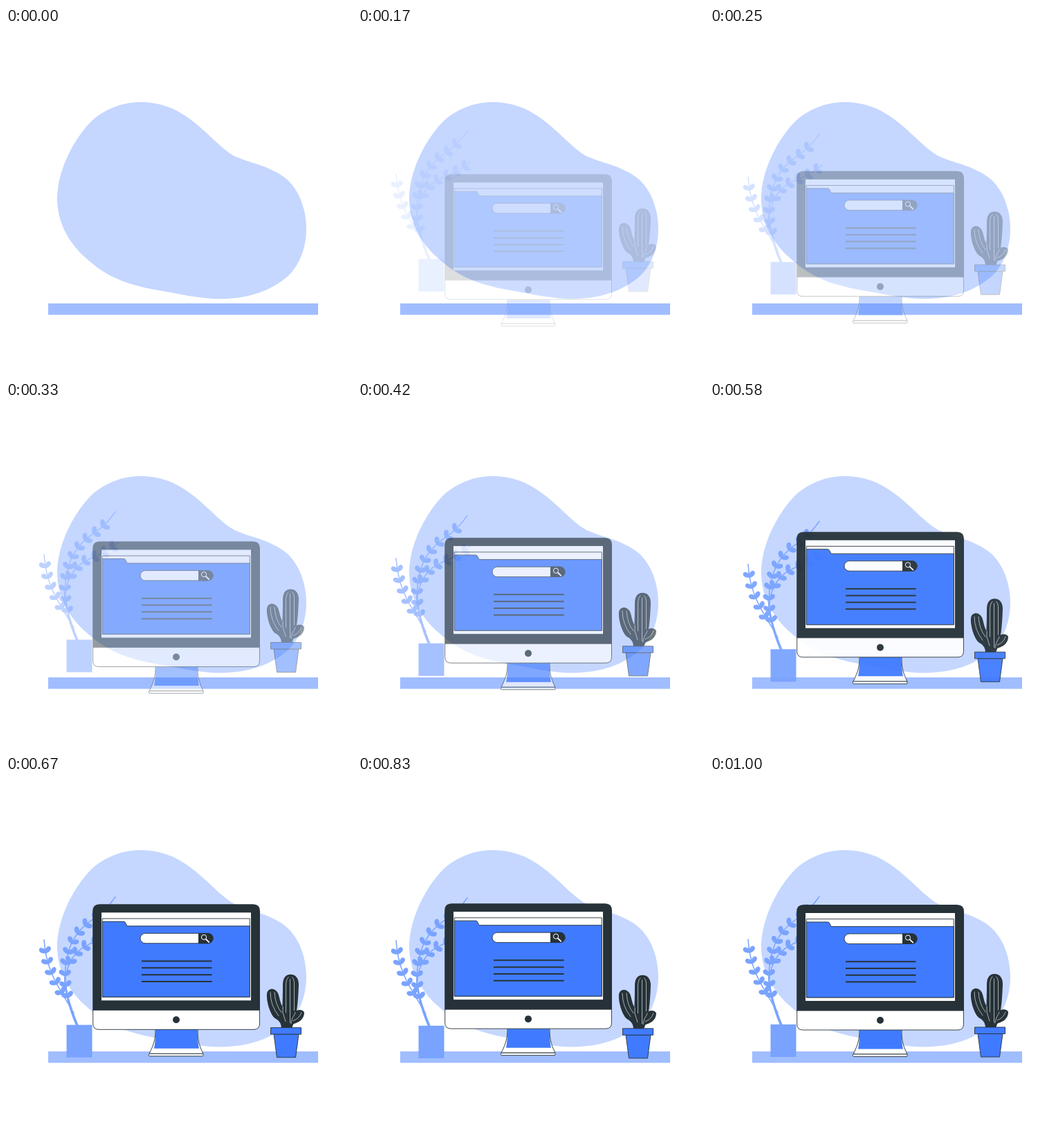
These frames come from a looping animation (500x500 px, 1040 ms). An HTML page:

```html
<!DOCTYPE html>
<html lang="en">
<head>
<meta charset="utf-8">
<title>Desk scene</title>
<style>
  html, body { margin: 0; width: 100%; height: 100%; overflow: hidden; background: #fff; }
  svg { display: block; width: 100%; height: 100%; }
  .blue { fill: #407bff; }
  .white { fill: #fff; }
  .dark { fill: #263238; }
  .edge { stroke: #263238; stroke-width: .9; stroke-linejoin: round; }
  .stem { fill: none; stroke: #79a3ff; stroke-width: 1.5; stroke-linecap: round; }
  .vein { fill: none; stroke: #fff; stroke-width: .6; stroke-linecap: round; }
</style>
</head>
<body>
<svg viewBox="0 0 500 500">
  <path fill="#c5d7ff" d="M123 135C144 116 170 107 195 107C222 107 245 116 265 131C290 149 310 174 330 185C354 196 382 199 405 218C423 233 434 261 434 290C434 316 425 341 409 357C384 380 350 391 310 391.5C280 391.5 250 384 220 379C185 373 150 363 122 338C100 320 76 293 74 250C73 210 95 164 123 135Z"/>
  <rect x="61" y="398" width="390" height="16.5" fill="#a0bdff"/>

  <g id="plant" fill="#79a3ff">
    <path class="stem" data-start="20" data-step="16" data-count="5" d="M55 236C58 285 80 310 98 342"/>
    <path class="stem" data-start="30" data-step="16" data-count="10" d="M158 174C150 186 141 196 126 206C108 218 94 236 89 258C82 285 84 312 103 360"/>
    <path class="stem" data-start="14" data-step="15" data-count="6" d="M162 219C150 230 135 236 121 242C100 251 88 268 85 296"/>
    <path d="M84 290C84 312 91 336 101 360H105C95 336 87 312 86 290Z"/>
    <rect x="87.5" y="359" width="37" height="47"/>
  </g>

  <g id="monitor">
    <path class="white edge" d="M216 367C216 380 214 388 207 402H285C278 388 277 380 277 367Z"/>
    <path class="blue" d="M216 367C216 379 215.5 387 214 394.5H279C277.5 387 277 379 277 367Z"/>
    <rect class="white edge" x="206.5" y="402" width="78.5" height="3.5" rx="1"/>
    <path class="dark" d="M125.2 340V196Q125.2 186 135.2 186H357Q367 186 367 196V340Z"/>
    <path class="white edge" d="M125.7 339H366.5V358.5Q366.5 367 358 367H134.2Q125.7 367 125.7 358.5Z"/>
    <circle class="dark" cx="246" cy="353" r="5"/>
    <rect class="white" x="138" y="198" width="216" height="127"/>
    <rect class="white edge" x="139.3" y="206.7" width="213" height="113.3"/>
    <path class="blue edge" d="M139.3 211H170Q172 211 172.8 213L175 217.5H352.3V320H139.3Z"/>
    <rect class="white edge" x="194" y="228" width="105" height="14.5" rx="7.25"/>
    <path class="dark" d="M278 227.6H292A7.6 7.6 0 0 1 292 242.9H278Z"/>
    <circle cx="286" cy="233.6" r="3.6" fill="none" stroke="#fff"/>
    <path d="M289 236.6L293.3 240.7" stroke="#fff" stroke-width="1.8" stroke-linecap="round"/>
    <path d="M196 268.2H297.5M196 278H297.5M196 287.8H297.5M196 297.6H297.5" stroke="#263238" stroke-width="2"/>
  </g>

  <g id="cactus">
    <path class="dark" d="M398 364C398 356 394 352 388 349C381 342 376 324 377 314C378 306 388 304 393 313C396 320 396 330 402 335L406 352V364Z"/>
    <path class="dark" d="M400 364C398 350 400 330 400 302C400 291 404 286 411 286C419 286 423 292 423 301C422 325 421 345 413 364Z"/>
    <path class="dark" d="M408 358C412 345 416 344 417 341C420 336 429 336 431 341C431 351 422 357 412 358Z"/>
    <path class="vein" d="M404.5 341V299Q405 293 408 290M410.5 356V293M416.5 338V297Q416 292 413.5 290M400 333V341L404 354"/>
    <path class="vein" d="M382 312Q382 331 394 346M388 312Q389 330 398 341M412 357C413 347 417 346 418 341M415 353Q424 350 427 341"/>
    <path class="blue edge" d="M387 372.5H423L418.5 406H391.5Z"/>
    <rect class="blue edge" x="382.5" y="363" width="44" height="9.5"/>
  </g>
</svg>
<script>
const LOOP = 1040, FPS = 24, SHIFT = 30;
const $ = id => document.getElementById(id);
const plant = $('plant'), monitor = $('monitor'), cactus = $('cactus');

// Leaf pairs along each stem, measured from its tip
function addLeaf(x, y, angle, flip) {
  const leaf = document.createElementNS('http://www.w3.org/2000/svg', 'path');
  leaf.setAttribute('d', 'M0 0C2-5 8-6 11-3C13 1 8 5 0 0Z');
  leaf.setAttribute('transform', `translate(${x} ${y}) rotate(${angle}) scale(1 ${flip})`);
  plant.append(leaf);
}

for (const stem of plant.querySelectorAll('.stem')) {
  const { start, step, count } = stem.dataset;
  for (let i = 0; i < +count; i++) {
    const at = +start + i * step;
    const p = stem.getPointAtLength(at), q = stem.getPointAtLength(at - 1);
    const angle = Math.atan2(q.y - p.y, q.x - p.x) * 180 / Math.PI;
    addLeaf(p.x, p.y, angle + 50, 1);
    addLeaf(p.x, p.y, angle - 50, -1);
  }
}

const bezier = (a, b, s) => 3 * a * s * (1 - s) ** 2 + 3 * b * s * s * (1 - s) + s ** 3;

// cubic-bezier(.36, -.01, .5, 1.38)
function ease(x) {
  if (x >= 1) return 1;
  let lo = 0, hi = 1;
  for (let i = 0; i < 30; i++) {
    const mid = (lo + hi) / 2;
    if (bezier(.36, .5, mid) < x) lo = mid; else hi = mid;
  }
  return bezier(-.01, 1.38, lo);
}

function place(group, dy, alpha) {
  group.setAttribute('transform', `translate(0 ${dy})`);
  group.setAttribute('opacity', alpha);
}

function draw(now) {
  // 24 steps per second, held on a 10 ms clock
  const ticks = Math.floor(now % LOOP / 10);
  const step = Math.ceil((ticks + .5) * FPS / 100) - 1;
  const p = step < 2 ? 0 : ease((step + 1) / FPS);
  const dy = SHIFT * (1 - p), alpha = Math.max(0, Math.min(1, p));
  place(monitor, dy, alpha);
  place(plant, -dy, alpha);
  place(cactus, -dy, alpha);
  requestAnimationFrame(tick);
}

const began = performance.now();
const tick = () => draw(performance.now() - began);
tick();
</script>
</body>
</html>
```
